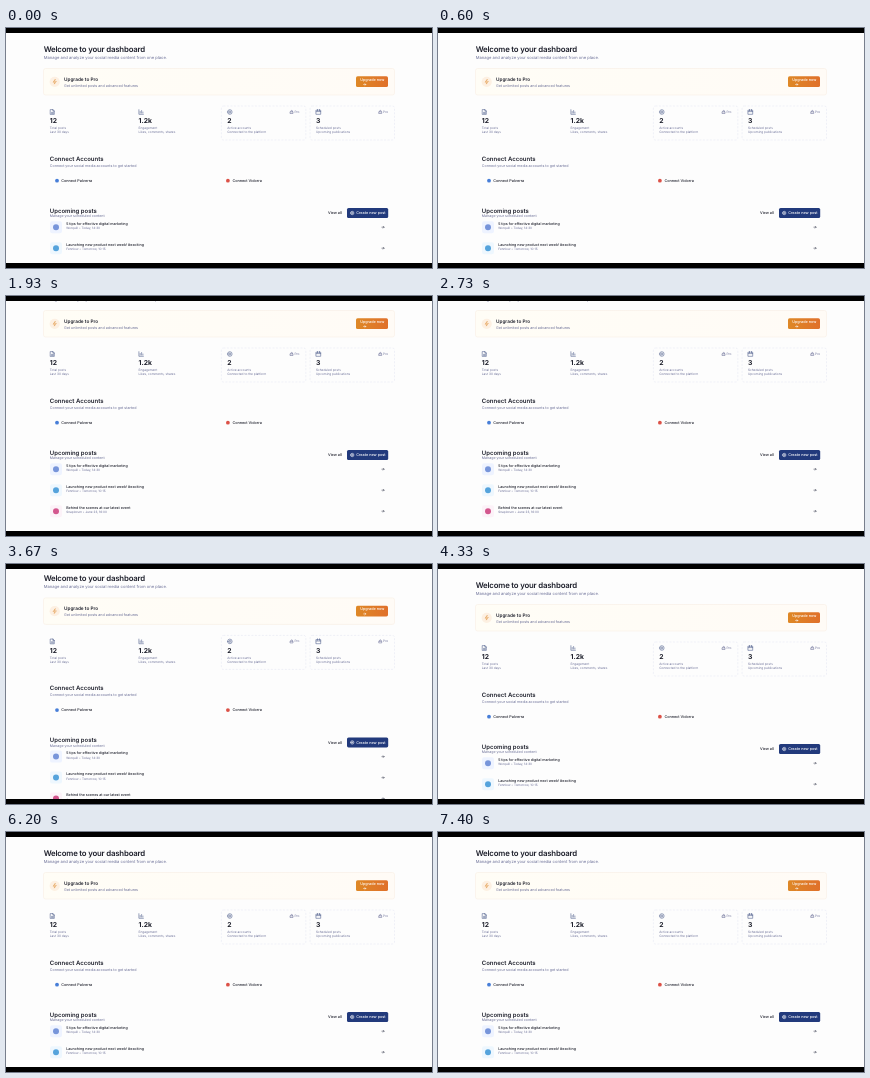
Write an HTML page that moves like this. It is 426 px wide and 240 px high and loops after 7.47 s.

```html
<!DOCTYPE html>
<html lang="en">
<head>
<meta charset="utf-8">
<title>Dashboard</title>
<style>
html, body { margin: 0; width: 100%; height: 100%; overflow: hidden; background: #000; }
svg { display: block; width: 100%; height: 100%; }
text { font-family: Inter, "Liberation Sans", sans-serif; text-rendering: geometricPrecision; white-space: pre; }
.icon { fill: none; stroke-width: .55; stroke-linecap: round; stroke-linejoin: round; }
</style>
</head>
<body>
<svg id="stage" viewBox="0 0 426 240">
  <defs>
    <clipPath id="view"><rect y="5" width="426" height="230"/></clipPath>
    <linearGradient id="orange">
      <stop stop-color="#de8826"/><stop offset="1" stop-color="#e0702a"/>
    </linearGradient>
    <linearGradient id="cream">
      <stop stop-color="#fffdf6"/><stop offset="1" stop-color="#fffbf6"/>
    </linearGradient>
  </defs>
  <rect width="426" height="240"/>
  <g clip-path="url(#view)">
    <rect y="5" width="426" height="230" fill="#fdfdfd"/>
    <g id="page"></g>
  </g>
</svg>
<script>
const LOOP = 7470, DEPTH = 26;
const INK = '#1d1f2b', MUTED = '#6c7098', NAVY = '#223a7c';
const page = document.getElementById('page');

function add(tag, attrs, content) {
  const el = document.createElementNS('http://www.w3.org/2000/svg', tag);
  for (const key in attrs) el.setAttribute(key, attrs[key]);
  if (content) el.textContent = content;
  page.appendChild(el);
}

// y is the middle of the lowercase letters
function label(x, y, size, content, fill = INK, weight = 400, spacing = 0) {
  add('text', { x, y: y + size * .34, 'font-size': size, fill, 'font-weight': weight,
    'letter-spacing': spacing }, content);
}
function box(x, y, width, height, rx, fill, extra = {}) {
  add('rect', { x, y, width, height, rx, fill, ...extra });
}
function dot(cx, cy, r, fill) { add('circle', { cx, cy, r, fill }); }
function icon(x, y, d, stroke) {
  add('path', { class: 'icon', d, stroke, transform: `translate(${x} ${y})` });
}

const ICONS = {
  file: 'M-1.8-2.4H.6L1.9-1V2.4H-1.8ZM.5-2.4V-.9H1.9M-.9.4H1M-.9 1.4H1',
  chart: 'M-2.2-2.3V2.3H2.3M-.9 1V-.5M.5 1V-1.5M1.8 1V0',
  globe: 'M-2.3 0A2.3 2.3 0 1 0 2.3 0A2.3 2.3 0 1 0-2.3 0M-1 0A1 1 0 1 0 1 0A1 1 0 1 0-1 0',
  calendar: 'M-2.2-1.8H2.2V2.3H-2.2ZM-2.2-.4H2.2M-1-2.6V-1.2M1-2.6V-1.2',
  lock: 'M-1.3-.2H1.3V1.5H-1.3ZM-.8-.2V-.8A.8.8 0 0 1 .8-.8V-.2',
  bolt: 'M.4-2.3L-1.7.4H0L-.4 2.3L1.7-.4H0Z',
  plus: 'M-1.7 0A1.7 1.7 0 1 0 1.7 0A1.7 1.7 0 1 0-1.7 0M-.8 0H.8M0-.8V.8',
  arrow: 'M-1.1 0H1.1M.2-.9L1.1 0L.2 .9'
};

function header() {
  label(37.7, 21.2, 7.82, 'Welcome to your dashboard', INK, 600, -.19);
  label(37.7, 29.5, 4.14, 'Manage and analyze your social media content from one place.', MUTED);
}

function banner() {
  box(37.5, 40.5, 351, 26.5, 2, 'url(#cream)', { stroke: '#f8efe4', 'stroke-width': .6 });
  dot(48.7, 53.8, 5.1, '#fdf0e2');
  icon(48.7, 53.8, ICONS.bolt, '#e29a4b');
  label(58, 51, 4.74, 'Upgrade to Pro', INK, 600);
  label(58, 57.4, 3.66, 'Get unlimited posts and advanced features', MUTED);
  box(350, 48.3, 32, 10.7, 1.6, 'url(#orange)');
  label(354.2, 51.7, 3.75, 'Upgrade now', '#fff', 500);
  icon(358.7, 56.5, ICONS.arrow, '#fff');
}

function stats() {
  const cards = [
    ['file', '12', 'Total posts', 'Last 30 days'],
    ['chart', '1.2k', 'Engagement', 'Likes, comments, shares'],
    ['globe', '2', 'Active accounts', 'Connected to the platform'],
    ['calendar', '3', 'Scheduled posts', 'Upcoming publications']
  ];
  cards.forEach(([shape, value, name, note], i) => {
    const x = 43.8 + i * 88.7;
    if (i > 1) {
      box(x - 5.8, 78, 84.4, 34, 2, 'none',
        { stroke: '#e6e8f4', 'stroke-width': .6, 'stroke-dasharray': '2 1.5' });
      icon(x + 64.5, 84, ICONS.lock, MUTED);
      label(x + 67.2, 84, 3.2, 'Pro', MUTED);
    }
    icon(x + 2.6, 84, ICONS[shape], '#465687');
    label(x, 92.8, 6.8, value, INK, 700);
    label(x, 100.2, 3.17, name, MUTED);
    label(x, 104.3, 3.17, note, MUTED);
  });
}

function accounts() {
  label(43.8, 130.5, 6, 'Connect Accounts', INK, 600);
  label(43.8, 137.6, 3.65, 'Connect your social media accounts to get started', MUTED);
  dot(51, 152.7, 1.9, '#477ed8');
  label(55.2, 152.6, 3.75, 'Connect Palverra', INK, 500);
  dot(221.9, 152.7, 1.9, '#dc5147');
  label(226.4, 152.6, 3.75, 'Connect Vidorra', INK, 500);
}

function posts() {
  label(43.8, 182.8, 5.98, 'Upcoming posts', INK, 600);
  label(43.8, 188.1, 3.6, 'Manage your scheduled content', MUTED);
  label(322, 185.1, 3.75, 'View all', INK, 500);
  box(341, 180, 41.2, 10, 1.6, NAVY);
  icon(346.2, 185, ICONS.plus, '#fff');
  label(350.2, 185, 3.75, 'Create new post', '#fff', 500);

  const rows = [
    ['5 tips for effective digital marketing', 'Worquill • Today, 14:30', '#7795da', '#eef3ff'],
    ['Launching new product next week! #exciting', 'Fennlow • Tomorrow, 10:15', '#55a3dc', '#eef7fe'],
    ['Behind the scenes at our latest event', 'Snaplorum • June 23, 16:00', '#d3578e', '#fcf2f8']
  ];
  rows.forEach(([title, note, color, tint], i) => {
    const y = 199.2 + i * 21;
    box(44, y - 6, 12, 12, 2.2, tint);
    dot(50, y, 3, color);
    label(60.2, y - 3.6, 3.65, title, INK, 500);
    label(60.2, y + 1.1, 3.1, note, MUTED);
    icon(377, y, ICONS.arrow, '#3b3f52');
  });
}

const smooth = (t, from, to) => {
  const p = Math.min(1, Math.max(0, (t - from) / (to - from)));
  return p * p * (3 - 2 * p);
};

function draw(now) {
  const t = now % LOOP;
  const scroll = DEPTH * (smooth(t, 700, 1700) - smooth(t, 3000, 4000));
  page.setAttribute('transform', `translate(0 ${-scroll.toFixed(2)})`);
}

header();
banner();
stats();
accounts();
posts();

const start = performance.now();
function tick() {
  draw(performance.now() - start);
  requestAnimationFrame(tick);
}
tick();
</script>
</body>
</html>
```
